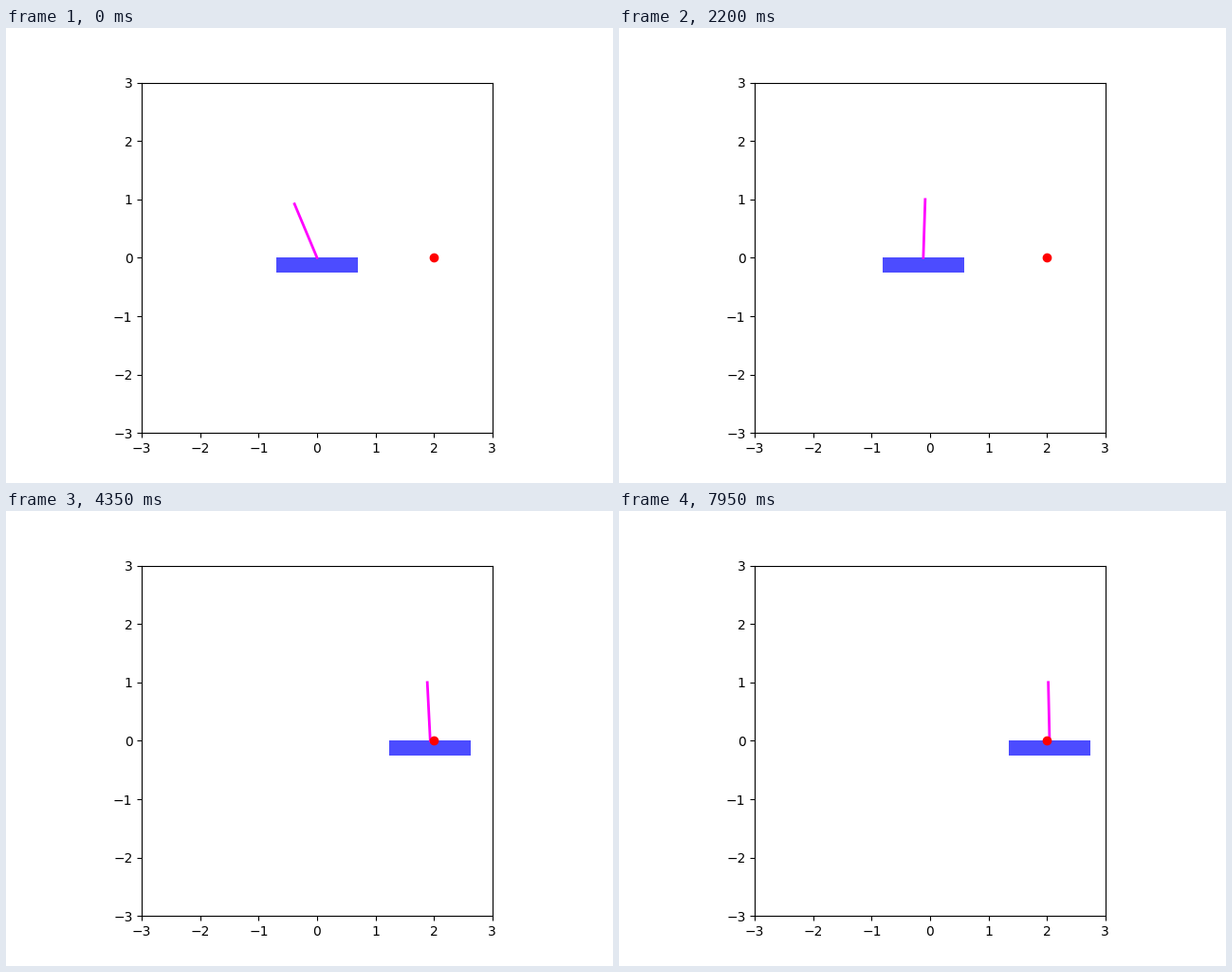
A matplotlib script for the animation above (8000 ms loop, 640x480 px).

```python
import numpy as np
import matplotlib.pyplot as plt
from matplotlib.animation import FuncAnimation
from matplotlib.patches import Rectangle

FRAMES, STEP_MS = 160, 50
DT = STEP_MS / 1000
GRAVITY = 9.8
CART_W, CART_H, POLE = 1.4, 0.25, 1.0
LEAN_START, LEAN_END = -0.387, -0.022  # horizontal reach of the pole tip

# key moments of the cart: time, position, velocity
MOVES = [
    (0.05, 0, 0), (0.45, -0.54, -2.15), (1.1, -1.475, 0), (1.725, -0.99, 1.5),
    (2.675, 0.812, 1.73), (3.45, 1.745, 0.59), (4.17, 1.949, 0),
    (5.38, 1.743, 0), (6.0, 1.802, 0.12), (6.85, 1.904, 0.19), (7.95, 2.045, 0),
]


def cart_path(t):
    """Cubic Hermite curve through the key moments."""
    times, pos, vel = np.array(MOVES).T
    i = np.clip(np.searchsorted(times, t) - 1, 0, len(times) - 2)
    h = times[i + 1] - times[i]
    s = (t - times[i]) / h
    ease = s * s * (3 - 2 * s)
    return (pos[i] + (pos[i + 1] - pos[i]) * ease
            + h * s * (1 - s) * (vel[i] * (1 - s) - vel[i + 1] * s))


def tip_path(x):
    """Balanced pendulum: tip'' = g / l * (tip - x), with both ends fixed."""
    n = len(x)
    c = POLE / (GRAVITY * DT ** 2)
    system = (1 + 2 * c) * np.eye(n) - c * (np.eye(n, k=1) + np.eye(n, k=-1))
    system[[0, -1]] = np.eye(n)[[0, -1]]
    rhs = x.copy()
    rhs[0] += LEAN_START
    rhs[-1] += LEAN_END
    return np.linalg.solve(system, rhs)


cart_x = cart_path(DT * np.arange(1, FRAMES))
tip_x = tip_path(cart_x)
tip_y = np.sqrt(POLE ** 2 - (tip_x - cart_x) ** 2)

fig = plt.figure(figsize=(6.4, 4.8), dpi=100)
ax = fig.add_subplot(111, aspect="equal", xlim=(-3, 3), ylim=(-3, 3))

cart = ax.add_patch(Rectangle((-CART_W / 2, -CART_H), CART_W, CART_H,
                              facecolor="blue", alpha=0.7, linewidth=0))
pole, = ax.plot([], [], color="magenta", lw=2)
goal, = ax.plot([2], [0], "ro")


def update(n):
    i = max(n - 1, 0)  # the opening pose is held for two steps
    cart.set_x(cart_x[i] - CART_W / 2)
    pole.set_data([cart_x[i], tip_x[i]], [0, tip_y[i]])
    return cart, pole, goal


anim = FuncAnimation(fig, update, frames=FRAMES, interval=STEP_MS,
                     init_func=lambda: update(0), repeat=True, repeat_delay=0)
plt.show()
```
